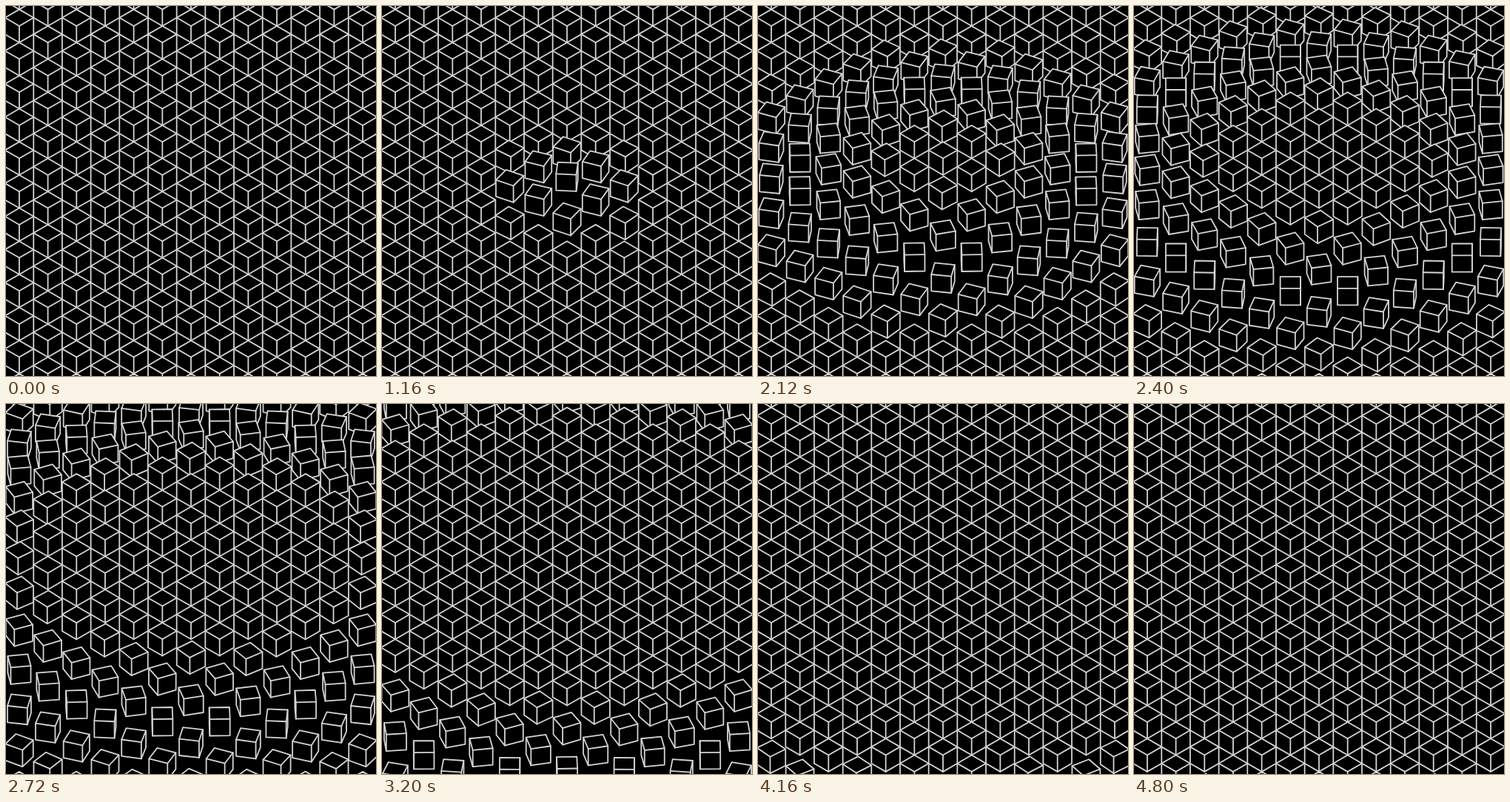
An HTML page with a canvas that plays this animation: 500 by 499 pixels, repeating every 4840 ms.

```html
<!DOCTYPE html>
<html lang="en">
<head>
<meta charset="utf-8">
<title>Rising cubes</title>
<style>
  html, body { margin: 0; width: 100%; height: 100%; overflow: hidden; background: #000; }
  canvas { display: block; }
</style>
</head>
<body>
<canvas id="stage" width="500" height="499"></canvas>
<script>
const ctx = document.getElementById('stage').getContext('2d');
const LOOP = 4840, STEP = 40;
const SLACK = 10;                   // absorbs clock jitter at step borders
const CX = 250, CY = 250.25;
const HALF = 19.34;                 // half width of a cube seen corner-on
const EDGE = HALF * 2 / Math.sqrt(3); // projected height of a vertical edge
const TILT = 1 / Math.sqrt(3);      // foreshortening of the ground plane
const CELL = HALF * 2 * Math.SQRT2; // ground distance between neighbours

// Back to front, so nearer cubes cover those behind.
const cubes = [];
for (let row = -14; row <= 14; row++) {
  for (let col = -6; col <= 6; col++) {
    if ((row + col) % 2) continue;
    const dx = col * HALF * 2, dy = row * EDGE;
    cubes.push({ x: CX + dx, y: CY + dy, dist: Math.hypot(dx, dy / TILT) / CELL });
  }
}

const clamp = v => Math.min(1, Math.max(0, v));
const smooth = v => v * v * (3 - 2 * v);

function trace(points, close) {
  ctx.beginPath();
  points.forEach(([x, y]) => ctx.lineTo(x, y));
  if (close) ctx.closePath();
}

function drawCube(x, y, turn) {
  const yaw = (turn > 0.5 ? turn - 1 : turn) * Math.PI / 2;
  const corner = (quarter, drop) => {
    const a = yaw + quarter * Math.PI / 2;
    return [x + HALF * Math.sin(a), y + HALF * TILT * Math.cos(a) + (drop - 0.5) * EDGE];
  };
  const left = corner(-1, 0), front = corner(0, 0), right = corner(1, 0), back = corner(2, 0);
  const base = corner(0, 1);
  trace([back, right, corner(1, 1), base, corner(-1, 1), left], true);
  ctx.fill();
  ctx.stroke();
  trace([left, front, right]);
  ctx.stroke();
  trace([front, base]);
  ctx.stroke();
}

function render(time) {
  const wave = 3 * smooth(time / LOOP);
  ctx.fillStyle = '#000';
  ctx.fillRect(0, 0, 500, 499);
  ctx.strokeStyle = '#d4d4d4';
  ctx.lineWidth = 1.8;
  ctx.lineJoin = ctx.lineCap = 'round';
  for (const { x, y, dist } of cubes) {
    const p = clamp(wave - dist / 5);
    drawCube(x, y - p * EDGE * 2, p);
  }
}

// Each step shows the pose at its middle.
const start = performance.now();
function tick() {
  const time = (performance.now() - start + SLACK) % LOOP;
  render((Math.floor(time / STEP) + 0.5) * STEP);
  requestAnimationFrame(tick);
}
tick();
</script>
</body>
</html>
```
